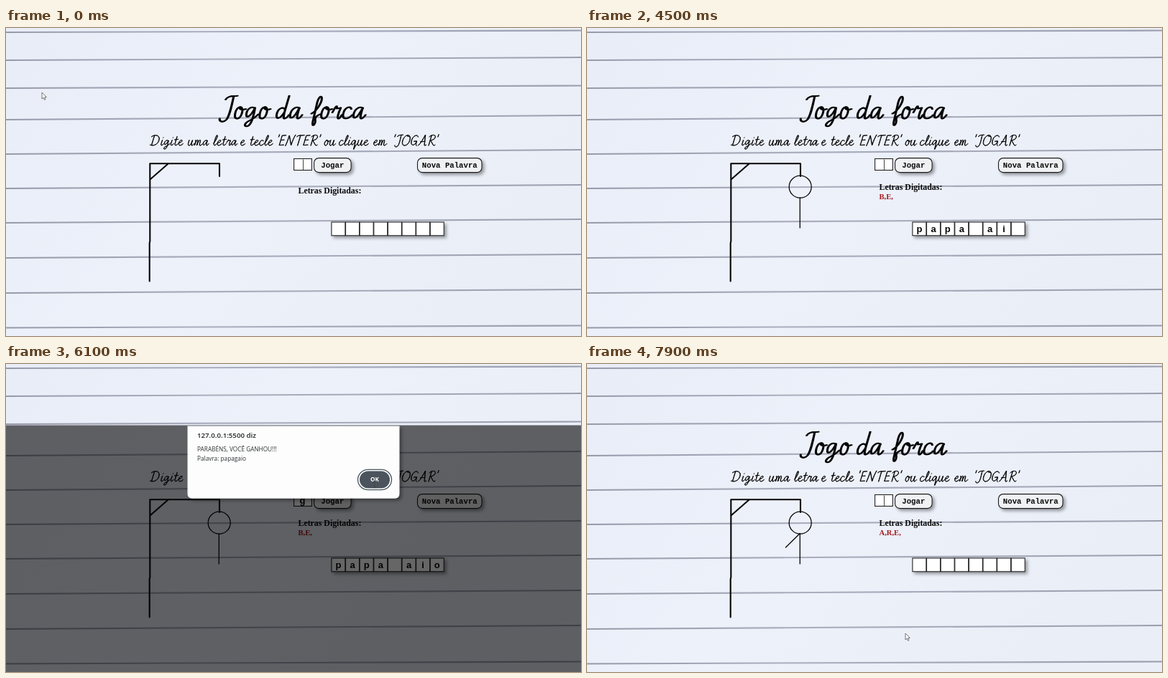
Animation of 800 by 430 pixels, one loop 8 s. Source, as an HTML page:

```html
<!DOCTYPE html>
<html lang="pt-BR">
<head>
<meta charset="utf-8">
<title>Jogo da forca</title>
<style>
html, body { margin: 0; width: 100%; height: 100%; overflow: hidden; background: #eaeef8; }
svg { display: block; width: 800px; height: 430px; }
text { white-space: pre; }
.rule { fill: none; stroke: url(#ink); stroke-width: 2.1; }
.pen { fill: none; stroke: #050505; stroke-linecap: round; stroke-linejoin: round; }
.read { fill: transparent; font-family: "Liberation Serif", serif; font-style: italic; }
.btn rect { fill: #f0f1f3; stroke: #1c1c1e; stroke-width: 1.1; filter: url(#soft); }
.btn text { font: bold 10.7px "Liberation Mono", "Courier New", monospace; text-anchor: middle; fill: #0a0a0a; }
.cell { fill: #fff; stroke: #222; stroke-width: 1.1; }
.letter { font: bold 13px "Liberation Sans", Arial, sans-serif; text-anchor: middle; fill: #080808; }
.label { font: bold 11.85px "Liberation Serif", "Times New Roman", serif; fill: #080808; }
.wrong { font: bold 10.6px "Liberation Serif", "Times New Roman", serif; fill: #a31c1f; }
.box { font: 8.25px "Open Sans", "Noto Sans", sans-serif; fill: #303236; }
.box .host { font-size: 9.7px; font-weight: 600; fill: #202226; }
.box .ok { font-size: 8.2px; font-weight: 700; fill: #fff; text-anchor: middle; }
</style>
</head>
<body>
<svg viewBox="0 0 800 430" xmlns="http://www.w3.org/2000/svg">
  <defs>
    <linearGradient id="paper" x2="1" y2=".4">
      <stop offset="0" stop-color="#e9edf7"/>
      <stop offset=".5" stop-color="#edf1fa"/>
      <stop offset="1" stop-color="#e9eef7"/>
    </linearGradient>
    <linearGradient id="ink" gradientUnits="userSpaceOnUse" x1="0" x2="800" y1="0" y2="0">
      <stop offset="0" stop-color="#9699a8"/>
      <stop offset=".35" stop-color="#abaebd"/>
      <stop offset=".7" stop-color="#a4a7b7"/>
      <stop offset="1" stop-color="#9a9dad"/>
    </linearGradient>
    <filter id="soft" x="-20%" y="-40%" width="150%" height="200%" color-interpolation-filters="sRGB">
      <feDropShadow dx="3" dy="3" stdDeviation="2.1" flood-color="#000" flood-opacity=".36"/>
    </filter>
    <filter id="blur" x="-5%" y="-5%" width="110%" height="110%" color-interpolation-filters="sRGB">
      <feGaussianBlur stdDeviation="0 .6"/>
    </filter>
  </defs>

  <rect width="800" height="430" fill="url(#paper)"/>
  <g id="rules" filter="url(#blur)"></g>

  <text class="read" x="297" y="126" font-size="36">Jogo da forca</text>
  <text class="read" x="200" y="164" font-size="18">Digite uma letra e tecle 'ENTER' ou clique em 'JOGAR'</text>
  <g id="hand" class="pen"></g>

  <g class="pen">
    <path d="M225 190L201 211M297 207V189.3H200.3V298L199.7 300V353.5" stroke-width="2.1"/>
    <circle class="part" cx="296.7" cy="221.7" r="15.5" stroke-width="1.3"/>
    <path class="part" d="M296.3 237V279" stroke-width="1.3"/>
    <path class="part" d="M296.3 236.5L276.5 256" stroke-width="1.3"/>
  </g>

  <rect class="cell" x="400.6" y="182.5" width="24.8" height="16"/>
  <text id="typed" class="letter" x="412.5" y="195"></text>
  <path id="caret" stroke="#444" stroke-width="1"/>
  <g class="btn">
    <rect x="428.6" y="181.6" width="51.5" height="20" rx="6.5"/>
    <text x="454.3" y="194.8">Jogar</text>
    <rect x="572.5" y="181.6" width="89.5" height="20" rx="6.5"/>
    <text x="617.3" y="194.8">Nova Palavra</text>
  </g>

  <text id="label" class="label" x="406.5">Letras Digitadas:</text>
  <text id="wrong" class="wrong" x="406.5" y="238.6"></text>
  <g id="cells"></g>

  <rect id="shade" y="85.5" width="800" height="344.5" fill="#000" fill-opacity=".6"/>
  <g id="dialog" class="box">
    <path d="M252.5 85.5H547.5V180Q547.5 186.7 540.8 186.7H259.2Q252.5 186.7 252.5 180Z" fill="#fcfdfc" filter="url(#soft)"/>
    <text class="host" x="266" y="101.6">127.0.0.1:5500 diz</text>
    <text x="266" y="121">PARABÉNS, VOCÊ GANHOU!!!</text>
    <text x="266" y="134.2">Palavra: papagaio</text>
    <rect id="ring" x="489.5" y="146.3" width="47" height="28.4" rx="14.2" fill="none" stroke="#4a5560" stroke-width="1.3"/>
    <rect id="ok" x="492" y="148.5" width="42" height="24" rx="12"/>
    <text class="ok" x="513" y="163.4">OK</text>
  </g>

  <g id="pointer">
    <path id="arrow" d="M0 0V9L2.1 7.2L3.6 10.3L5 9.6L3.6 6.7L6.3 6.4Z" fill="#fff" stroke="#555" stroke-width=".8"/>
    <path id="beam" d="M-1.8-4.8Q0-4.8 0-3.8Q0-4.8 1.8-4.8M0-3.8V3.8M-1.8 4.8Q0 4.8 0 3.8Q0 4.8 1.8 4.8" fill="none" stroke="#444" stroke-width=".9"/>
  </g>
</svg>

<script>
const LOOP = 8000, STEP = 100;
const $ = id => document.getElementById(id);
const show = (el, on) => el.setAttribute('visibility', on ? 'visible' : 'hidden');

// Handwriting: advance width and pen path, 100 units per em, baseline at 0.
const GLYPHS = {
  a: [43, 'M30-33C20-42 3-33 4-13C5 4 18 2 29-35C27-14 26-1 32 0C36 0 40-6 43-12'],
  c: [34, 'M27-31C24-42 4-39 4-15C4 4 22 4 34-12'],
  d: [44, 'M28-30C18-41 3-32 4-13C5 4 18 2 28-22L32-74C28-30 25 0 32 0C37 0 41-6 44-12'],
  e: [35, 'M5-18C18-18 27-28 23-36C16-42 3-30 5-13C7 4 24 3 35-12'],
  f: [30, 'M2-16C18-26 28-52 25-66C21-78 14-70 13-52L12 12C13 30 24 20 18 2C16-6 22-10 31-14'],
  g: [43, 'M28-33C18-42 3-33 4-16C5 0 18-2 28-35C29-4 28 24 14 25C4 25 4 14 18 7C28 2 36-4 43-14'],
  i: [25, 'M10-37L7-12C6 3 16 2 25-12M12-54L13-55'],
  l: [27, 'M4-16C16-30 24-58 20-70C14-80 8-50 8-16C8 4 18 3 27-12'],
  m: [60, 'M4-35C8-41 10-35 9-26L6 0C9-24 14-39 20-38C26-37 23-18 22 0C27-30 31-39 37-38C44-37 38-16 40-5C42 3 51 2 60-12'],
  o: [37, 'M16-38C2-35 0-2 14 0C29 1 31-36 16-38C13-30 24-27 36-31'],
  q: [43, 'M28-33C18-42 3-33 4-15C5 2 18 0 28-35L27 27C30 16 34 2 43-12'],
  r: [34, 'M2-20C6-30 8-40 12-40C15-34 10-32 16-33L26-35C22-20 20-1 26 0C30 0 32-6 34-12'],
  t: [31, 'M14-62L10-14C9 2 20 4 31-12M2-40L26-43'],
  u: [44, 'M6-37C2-14 3 0 12 0C21 0 26-16 29-37C26-14 26 0 32 0C37 0 40-6 44-12'],
  A: [64, 'M4 0C18-14 30-50 38-74L46-2C50 2 54 0 58-4M14-26L44-28'],
  D: [74, 'M22-68L16-2M4-62C30-84 66-66 60-34C56-4 28 6 6-4'],
  E: [48, 'M40-71L14-69C12-40 10-20 8-2L38-4M12-37L34-39'],
  G: [56, 'M46-60C42-80 4-72 6-28C8 10 40 0 42-30L24-29M42-30C42-10 42 0 48 2'],
  J: [46, 'M10-62C16-76 32-72 46-74M34-72C34-40 34-8 26 4C18 14 4 10 4 0'],
  N: [66, 'M4 2C10-20 14-50 16-70L42-2C46-30 50-54 58-74'],
  O: [62, 'M34-72C0-70-4 0 26 0C62 0 66-72 34-72C28-64 36-60 46-64'],
  R: [58, 'M18-68L12 0M4-60C16-78 48-78 46-56C44-42 28-36 18-36L44-2C48 2 52 0 56-4'],
  T: [54, 'M4-62C10-74 30-68 54-72M28-70L22 0'],
  "'": [14, 'M8-76L6-60']
};

// Each stroke is laid down twice, a nib apart, so that downstrokes are heavier.
function write(word, x, y, scale, pen, nib) {
  let at = 0, out = '';
  for (const ch of word) {
    const [advance, d] = GLYPHS[ch];
    for (const dx of [0, nib / scale]) out += `<path transform="translate(${at + dx})" d="${d}"/>`;
    at += advance;
  }
  return `<g transform="translate(${x} ${y}) scale(${scale}) skewX(-12)" stroke-width="${pen / scale}">${out}</g>`;
}

const title = [['Jogo', 295], ['da', 373], ['forca', 422]];
const hint = [['Digite', 199], ['uma', 252], ['letra', 287], ['e', 325], ['tecle', 338],
  ["'ENTER'", 375.5], ['ou', 441.5], ['clique', 462], ['em', 510], ["'JOGAR'", 537]];
$('hand').innerHTML =
  title.map(([w, x]) => write(w, x, 126.5, .43, 1.9, 1.2)).join('') +
  hint.map(([w, x]) => write(w, x, 164, .2, .9, .4)).join('');

// Ruled lines: height at the left and right edges.
const rules = [[6, 3.5], [45, 41], [84, 80.5], [128, 122], [176, 170], [224, 219],
  [272, 267], [321, 316], [370, 365], [418.5, 415.5]];
$('rules').innerHTML = rules.map(([l, r]) =>
  `<path class="rule" d="M0 ${l}Q400 ${(l + r) / 2 - .6} 800 ${r}"/>`).join('');

const PITCH = 19.62;
let row = '', slots = '';
for (let i = 0; i < 8; i++) {
  const x = 452.9 + i * PITCH;
  row += `<rect class="cell" x="${x}" y="271" width="${PITCH - .6}" height="18.8"/>`;
  slots += `<text class="letter slot" x="${x + 9.5}" y="284.6"></text>`;
}
$('cells').innerHTML = `<g filter="url(#soft)">${row}</g>${slots}`;
const slotEls = document.querySelectorAll('.slot');
const parts = document.querySelectorAll('.part');

// Game states: time, letter in the field, word so far, wrong letters.
const game = [
  [0, '', '', ''],
  [1900, 'b', '', ''], [2100, '', '', 'B,'],
  [2500, 'a', '', 'B,'], [2700, '', ' a a a', 'B,'],
  [3000, 'e', ' a a a', 'B,'], [3200, '', ' a a a', 'B,E,'],
  [3700, 'p', ' a a a', 'B,E,'], [3900, '', 'papa a', 'B,E,'],
  [4300, 'i', 'papa a', 'B,E,'], [4500, '', 'papa ai', 'B,E,'],
  [4800, 'o', 'papa ai', 'B,E,'], [5000, '', 'papa aio', 'B,E,'],
  [5500, 'g', 'papa aio', 'B,E,'],
  [6200, '', '', ''],
  [6800, 'a', '', ''], [7000, '', '', 'A,'],
  [7200, 'r', '', 'A,'], [7400, '', '', 'A,R,'],
  [7600, 'e', '', 'A,R,'], [7800, '', '', 'A,R,E,']
];

// Pointer: time, x, y, shape from then on.
const moves = [
  [0, 50, 90, 'arrow'], [300, 330, 220, 'arrow'], [500, 590, 286, 'arrow'], [700, 726, 215, 'arrow'],
  [900, 595, 196, 'arrow'], [1200, 417, 190, 'beam'], [1900, 417, 190, 'none'],
  [5800, 430, 200, 'arrow'], [6100, 513, 168, 'beam'], [6200, 513, 168, 'beam'],
  [6300, 505, 215, 'arrow'], [6700, 443, 376, 'arrow']
];

const indexAt = (table, t) => table.findLastIndex(entry => entry[0] <= t);

function drawGame(t) {
  const [since, typed, word, wrong] = game[indexAt(game, t)];
  $('typed').textContent = typed;
  $('wrong').textContent = wrong;
  $('label').setAttribute('y', wrong ? 225.6 : 231.3);
  slotEls.forEach((el, i) => el.textContent = (word[i] || '').trim());
  parts.forEach((el, i) => show(el, i < wrong.length / 2));
  $('caret').setAttribute('d', `M${typed ? 417.5 : 413.5} 183.5V198`);
  show($('caret'), (t - since) % 1000 < 500);
}

function drawDialog(t) {
  const open = t >= 5700 && t < 6200;
  show($('shade'), open);
  $('dialog').style.display = t >= 5700 && t < 6300 ? '' : 'none';
  $('dialog').setAttribute('opacity', open ? 1 : .92);
  $('dialog').setAttribute('transform', `translate(0 ${open ? 1 : 0})`);
  $('ring').style.display = open ? '' : 'none';
  $('ok').setAttribute('fill', open ? '#4b545d' : '#454a50');
}

function drawPointer(t) {
  const i = indexAt(moves, t);
  const [t0, x0, y0, shape] = moves[i];
  const [t1, x1, y1] = moves[i + 1] || [LOOP, x0, y0];
  const k = (t - t0) / (t1 - t0);
  $('pointer').setAttribute('transform', `translate(${x0 + (x1 - x0) * k} ${y0 + (y1 - y0) * k})`);
  show($('arrow'), shape === 'arrow');
  show($('beam'), shape === 'beam');
}

const start = performance.now();
function frame() {
  const t = Math.floor((performance.now() - start) % LOOP / STEP) * STEP;
  drawGame(t);
  drawDialog(t);
  drawPointer(t);
  requestAnimationFrame(frame);
}
frame();
</script>
</body>
</html>
```
